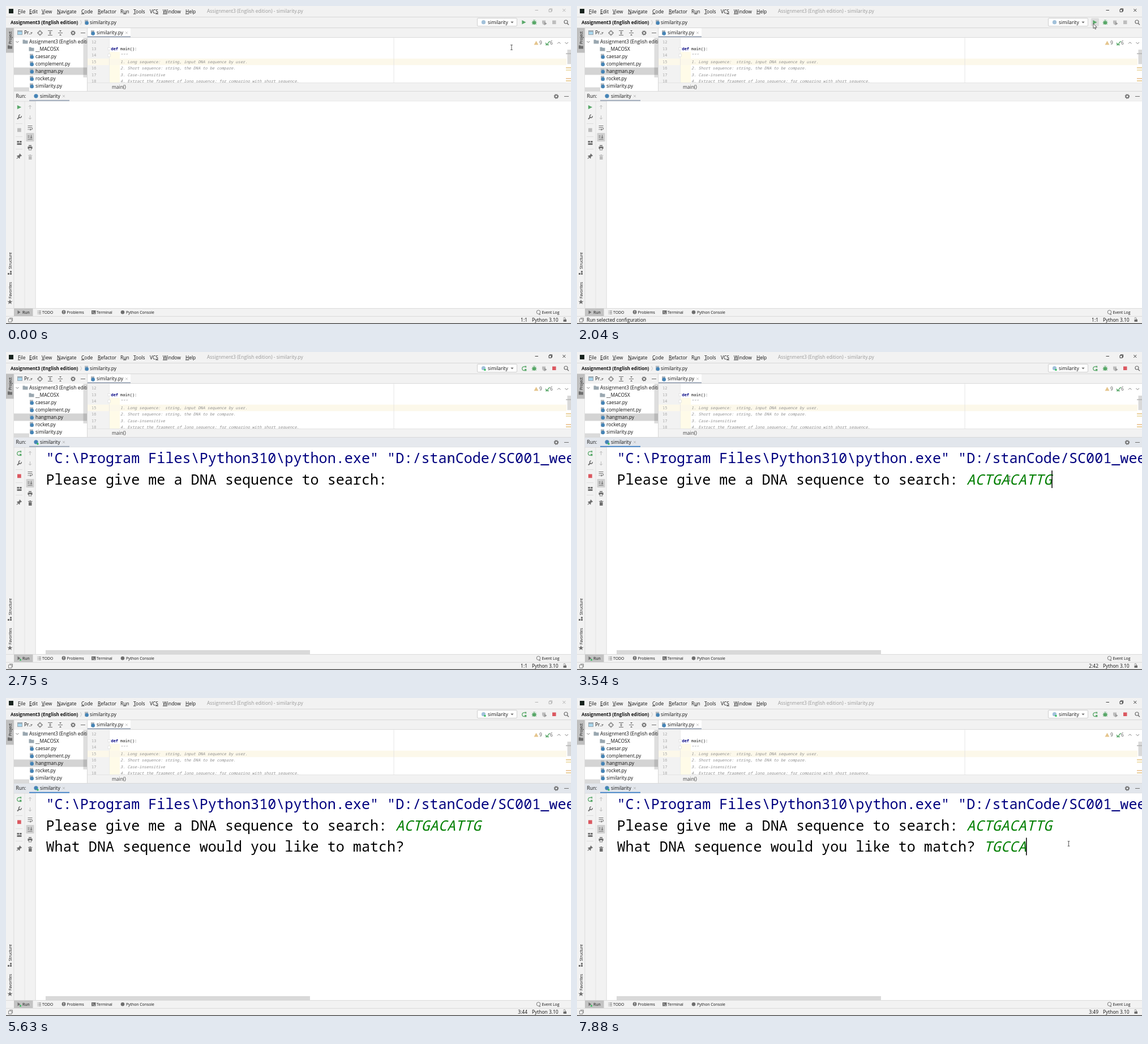
Recreate the animation shown at these times as an HTML page. Size 998 by 561 pixels, loop 8 s.

```html
<!DOCTYPE html>
<html lang="en">
<head>
<meta charset="utf-8">
<title>DNA similarity run</title>
<style>
html, body { margin: 0; width: 100%; height: 100%; overflow: hidden; background: #f2f2f2; }
svg { display: block; width: 998px; height: 561px; }
text { font: 8.45px "Open Sans", "Noto Sans", sans-serif; fill: #111; white-space: pre; }
.small { font-size: 6.85px; }
.bold { font-weight: 700; font-size: 8.1px; }
.dim { fill: #999; }
.code { font: 6.93px "Noto Sans Mono", "DejaVu Sans Mono", monospace; }
.doc { fill: #8c8c8c; font-style: italic; }
.num { fill: #a3a3a3; }
.key { fill: #000080; font-weight: 600; }
.term { font: 25.12px "Noto Sans Mono", "DejaVu Sans Mono", monospace; fill: #000; }
.cmd { fill: #00007f; }
.input { fill: #007f00; font-style: italic; }
.u { text-decoration: underline; text-decoration-thickness: .6px; }
</style>
</head>
<body>
<svg id="stage" viewBox="0 0 998 561" xmlns="http://www.w3.org/2000/svg"></svg>
<script>
const LOOP = 8000;
const GREY = '#6e6e6e', PALE = '#bdbdbd', GREEN = '#59a869', RED = '#db5860', LINE = '#d1d1d1';
const COL = 15.07, LEFT = 70.5;

const rect = (x, y, w, h, fill, more = '') =>
  `<rect x="${x}" y="${y}" width="${w}" height="${h}" fill="${fill}" ${more}/>`;
const path = (d, stroke = GREY, more = '') =>
  `<path d="${d}" fill="none" stroke="${stroke}" ${more}/>`;
const shape = (d, fill = GREY) => `<path d="${d}" fill="${fill}"/>`;
const dot = (x, y, r, fill, more = '') => `<circle cx="${x}" cy="${y}" r="${r}" fill="${fill}" ${more}/>`;
// y is the middle of the text line
const text = (x, y, s, cls = '', more = '') =>
  `<text x="${x}" y="${y + (cls === 'small' ? 2.5 : 3)}" class="${cls}" ${more}>${s}</text>`;
const group = (id, body) => `<g id="${id}">${body}</g>`;

const play = (x, y, s = 3.6) => shape(`M${x - s} ${y - s}L${x + s} ${y}L${x - s} ${y + s}Z`, GREEN);
const cross = (x, y) => path(`M${x - 2} ${y - 2}l4 4m0-4l-4 4`, '#aaa', 'stroke-width=".7"');
const down = (x, y, s = 2.6) => shape(`M${x - s} ${y - s / 2}h${2 * s}l${-s} ${s * 1.2}Z`);
const blob = (x, y, more) => dot(x, y, 3.6, '#4584b6', more);
const pyFile = (x, y) => rect(x - 3, y - 4.5, 6, 8, '#aeb6bd') + dot(x + .8, y + 1, 3.2, '#4584b6');
const folder = (x, y) => shape(`M${x - 4.5} ${y - 3.5}h3.5l1.2 1.3h4.3v5.7h-9Z`, '#9aa7b0');
const gear = (x, y) => dot(x, y, 2.5, 'none', `stroke="${GREY}" stroke-width="1.7"`) +
  dot(x, y, 3.7, 'none', `stroke="${GREY}" stroke-width="1.2" stroke-dasharray="1.45 1.45"`);
const rerun = (x, y) =>
  path(`M${x + 2} ${y - 2.6}A3.4 3.4 0 1 0 ${x + 3.4} ${y + 1}`, GREEN, 'stroke-width="1.3"') +
  shape(`M${x + 1} ${y - 4.6}l3.4 .4l-.8 3.6Z`, GREEN) + rect(x + 1, y + 1, 3.4, 3.4, GREEN);
const dash = (x, y) => path(`M${x - 4} ${y}h8`);

function titleBar() {
  const menu = [[21, '_File'], [41, '_Edit'], [63, '_View'], [90, '_Navigate'], [133, '_Code'],
    [162, '_Refactor'], [202, 'R_un'], [225, '_Tools'], [254, 'VC_S'], [277, '_Window'], [317, '_Help']];
  return rect(5, 5, 8, 8, '#17231d') +
    menu.map(([x, s]) => text(x, 9.5, s.replace(/_(.)/, '<tspan class="u">$1</tspan>'))).join('') +
    text(355, 9.3, 'Assignment3 (English edition) - similarity.py', 'dim') +
    `<g id="win" fill="none" stroke-width=".8"><path d="M934.500 7.500h5.500M959 6h4.300v4.300h-4.300ZM960.300 6v-1.200h4.300v4.300h-1.300M983.300 5l5 5m0-5l-5 5"/></g>` +
    rect(0, 19, 998, .8, LINE);
}

function navBar() {
  const bug = dot(933, 29.5, 3.2, GREEN) +
    path('M929 26.500l8 6M937 26.500l-8 6M928.500 29.500h9M931 25l4 0', GREEN, 'stroke-width=".9"');
  return text(8, 28.7, 'Assignment3 (English edition)', 'bold') +
    path('M131.500 25l2 4l-2 4', '#aaa', 'stroke-width=".6"') + pyFile(142, 29) + text(148, 28.7, 'similarity.py') +
    rect(832.5, 21.5, 70, 14, '#fff', 'rx="1.500" stroke="#c4c4c4" stroke-width=".8"') +
    blob(843.5, 28.7, 'opacity=".5"') + text(851, 28.7, 'similarity') + down(894, 28.7) +
    group('hover', rect(908, 21.5, 14, 14, '#dcdcdc', 'rx="1.500"')) +
    group('topIdle', play(915, 28.7) + rect(965, 25.5, 6.5, 6.5, PALE)) +
    group('topRun', rerun(915, 29) + rect(965, 25.5, 6.5, 6.5, RED) + dot(846, 31.500, 1.7, '#32c05a')) +
    bug + shape('M947 25.500h6v4q-1 3-3 4q-3-2-3-4Z', PALE) + shape('M951 28l4.500 3l-4.500 3Z', '#999') +
    dot(989, 28, 3, 'none', `stroke="${GREY}" stroke-width="1.200"`) + path('M991 30.300l3 3', GREY, 'stroke-width="1.400"') +
    rect(0, 38, 998, .8, LINE);
}

function sidebar() {
  const tab = (y, s) => `<text class="small" transform="translate(9.500 ${y}) rotate(-90)">${s}</text>`;
  return rect(0, 38.5, 14, 44, '#bfbfbf') + tab(67, 'Project') + shape('M3 69.500h3l1 1h4v5h-8Z') +
    tab(464, 'Structure') + rect(3, 471, 3, 3, GREY) + rect(7, 471, 3, 3, GREY) + rect(7, 467.3, 3, 3, GREY) +
    tab(516, 'Favorites') + shape('M7 517.500l1.200 3.200h3.400l-2.700 2l1 3.200l-2.900-2l-2.900 2l1-3.200l-2.700-2h3.400Z') +
    rect(13.5, 38, .7, 495, LINE);
}

function projectPane() {
  const files = ['caesar.py', 'complement.py', 'hangman.py', 'rocket.py', 'similarity.py'];
  return rect(14, 56, 129, 94.5, '#fff') + rect(14, 108.5, 129, 13, '#d4d4d4') +
    rect(20, 43, 9, 8, '#9aa7b0') + rect(21, 45.500, 7, 4.500, '#a9d7ee') + text(32, 47, 'Pr..') + down(45, 47.5, 2) +
    dot(60, 47.5, 3.5, 'none', `stroke="${GREY}"`) + path('M60 42.500v3.500M60 49v3.500M55 47.500h3.500M61.500 47.500h3.500') +
    path('M74 43.500h8M74 51.500h8') + shape('M76 47l2-2.200l2 2.200ZM76 48l2 2.200l2-2.200Z') +
    path('M92 47.500h8') + shape('M94 43l2 2.500l2-2.500ZM94 52l2-2.500l2 2.500Z') +
    gear(118.5, 47.5) + dash(136, 47.5) +
    path('M17.500 62l2.500 2.500l2.500-2.500', GREY, 'stroke-width=".9"') + folder(34, 63) +
    `<g clip-path="url(#tree)">${text(41, 62.7, 'Assignment3 (English edition)')}</g>` +
    folder(45, 76) + text(52, 75.7, '__MACOSX') +
    files.map((s, i) => pyFile(45, 89 + i * 13) + text(52, 88.7 + i * 13, s)).join('') +
    rect(136.5, 56, 6.5, 70, '#000', 'opacity=".13"') + rect(14, 143.5, 27, 6.5, '#dadada') +
    rect(143, 38, .8, 112, LINE);
}

function editor() {
  const code = ['', '<tspan class="key">def</tspan> main():', '    """',
    '    1. Long sequence:  string, input DNA sequence by user.',
    '    2. Short sequence: string, the DNA to be compare.', '    3. Case-insensitive',
    '    4. Extract the fragment of long sequence; for comparing with short sequence.'];
  const marks = [[84, '#b5b5b5'], [109, '#e3c07a'], [113, '#e8d69b'], [128, '#e8bb85'], [132, '#e3c07a']];
  const lines = code.map((s, i) => {
    const y = 66.3 + i * 11.5;
    return `<text x="151" y="${y}" class="code num">${i + 12}</text>` +
      `<text x="185.500" y="${y}" class="code ${i > 1 ? 'doc' : ''}">${s}</text>`;
  }).join('');
  return rect(144, 39, 76, 16, '#fff') + pyFile(153, 47.5) + text(160, 47, 'similarity.py') + cross(213, 47.3) +
    rect(144, 53.3, 76, 2, '#9ca7b8') + rect(144, 55.3, 854, .7, LINE) +
    rect(182, 56, 816, 79.5, '#fff') + rect(183, 81, 18, 54.5, '#fffbe8') + rect(144, 92.8, 846, 11.5, '#fcf8ea') +
    rect(182, 56, .6, 79, '#dedede') + rect(684.7, 56, .7, 79, '#dcdcdc') +
    `<g clip-path="url(#edit)">${lines}</g>` +
    [75.5, 87].map(y => rect(180, y - 2.2, 4.4, 4.4, '#fff', 'stroke="#d2d2d2" stroke-width=".5"')).join('') +
    shape('M936.500 61.500l4 7h-8Z', '#e5c58c') + text(942, 65, '9', '', 'fill-opacity=".7"') +
    path('M953 65l2.500 3l5-6M953 68.500h6', GREEN, 'stroke-width="1.400"') + text(961, 65, '6', '', 'fill-opacity=".7"') +
    path('M974 66.500l2.700-2.700l2.700 2.700M987.500 64l2.700 2.700l2.700-2.700', GREY, 'stroke-width=".9"') +
    rect(991.5, 77, 6.5, 25.5, '#d9d9d9') + marks.map(([y, c]) => rect(989, y - .7, 9, 1.5, c)).join('') +
    rect(144, 135.3, 854, 15, '#f2f2f2') + rect(144, 135, 854, .6, '#ddd') +
    text(187, 142.8, 'main()', '', 'fill-opacity=".8"');
}

function runPane() {
  const arrow = (y, d) => path(`M42.500 ${y - 3.3}v6.600M${40} ${y + d * .8}l2.500 ${d * 2.5}l2.500 ${-d * 2.5}`, '#b5b5b5', 'stroke-width=".9"');
  const bin = c => rect(40, 264.7, 5.5, 6.3, c) + rect(39, 263, 7.5, 1, c) + rect(41.5, 262, 2.5, 1, c);
  const sep = y => rect(17, y, 12, .6, '#d0d0d0');
  const term = (id, x, y, s, cls = '') => group(id, `<text x="${x}" y="${y}" class="term ${cls}">${s}</text>`);
  return `<rect id="head" x="14" y="150.500" width="984" height="17.500"/>` + rect(14, 150, 984, .7, LINE) +
    text(17.5, 158.8, 'Run:') + blob(53, 158.8) + text(60, 158.8, 'similarity') + cross(102, 159) +
    `<rect id="under" x="41" y="165.800" width="71" height="2"/>` + gear(972, 159.5) + dash(990, 159.5) +
    rect(14, 167.8, 984, .6, LINE) + rect(52, 168.2, 946, 364.8, '#fff') +
    rect(32.7, 168, .6, 365, '#d8d8d8') + rect(51.8, 168, .7, 365, LINE) +
    group('leftIdle', play(23.5, 178.5) + rect(20, 215.5, 6.7, 6.7, PALE) + bin(PALE)) +
    group('leftRun', rerun(23, 178.8) + rect(20, 215.5, 6.7, 6.7, RED) + bin(GREY) + dot(56, 162, 1.7, '#32c05a')) +
    path('M20 199.500l4-4', GREY, 'stroke-width="2"') + path('M27.300 194a2.500 2.500 0 1 1 -2.300-2', GREY, 'stroke-width="1.400"') +
    sep(207) + sep(230) + rect(19.5, 238, 3.6, 3, GREY) + rect(24, 238, 3.6, 3, GREY) + rect(19.5, 242, 8, 3, GREY) +
    sep(252) + shape('M24 260l4 4l-1 1l-1-.3l-1.500 1.700v2l-1 .8l-1.700-1.900l-2.500 2.500l-.8-.8l2.500-2.500l-1.900-1.700l.8-1h2l1.700-1.500Z') +
    arrow(178.5, -1) + arrow(196.5, 1) +
    path('M38.500 211.500h8M38.500 214.500h6.500a1.700 1.700 0 0 1 0 3.400h-2.500M38.500 217.800h2') + shape('M43.500 216l-2.300 2l2.300 2Z') +
    rect(35.5, 224, 14, 15, '#cfcfcf', 'rx="1"') +
    path('M38.500 229h3M38.500 231.500h3M38.500 235h8M44.500 227.500v5') + shape('M42.500 231h4l-2 2.700Z') +
    rect(38.5, 248, 8, 4, GREY) + rect(40, 245.5, 5, 1.7, GREY) + rect(40.3, 250.5, 4.4, 3.5, '#f2f2f2', `stroke="${GREY}" stroke-width=".8"`) +
    `<g clip-path="url(#console)">` +
    term('command', LEFT, 196.3, '"C:\\Program Files\\Python310\\python.exe" "D:/stanCode/SC001_week', 'cmd') +
    term('ask', LEFT, 233.8, 'Please give me a DNA sequence to search: ') +
    term('long', LEFT + 41 * COL, 233.8, 'ACTGACATTG', 'input') +
    term('askShort', LEFT, 271.3, 'What DNA sequence would you like to match? ') +
    term('short', LEFT + 43 * COL, 271.3, 'TGCCA', 'input') +
    '</g>' + group('scroll', rect(70, 526, 467, 7, '#d9d9d9')) + rect(0, 0, 1.5, 31, '#000', 'id="caret"');
}

function bottom() {
  const y = 540.3;
  return rect(0, 533, 998, .7, LINE) + rect(14, 533.5, 33.5, 13.5, '#c3c3c3') +
    shape('M20.500 537l5 3.300l-5 3.300Z') + group('runDot', dot(25.500, 543, 1.6, '#32c05a')) + text(29, y, 'Run', 'small') +
    path('M55.500 538h1M55.500 540.500h1M55.500 543h1M57.500 538h4.500M57.500 540.500h4.500M57.500 543h4.500', GREY, 'stroke-width=".9"') +
    text(64, y, 'TODO', 'small') +
    dot(102, 540, 3.4, GREY) + rect(101.5, 537.8, 1, 2.7, '#fff') + rect(101.5, 541.3, 1, 1, '#fff') + text(107.5, y, 'Problems', 'small') +
    rect(151, 537, 7.5, 6.5, GREY) + path('M152.500 538.500l1.700 1.500l-1.700 1.500M155 542h2', '#fff', 'stroke-width=".7"') +
    text(160, y, 'Terminal', 'small') + dot(206, 540.3, 3.3, GREY) + text(212, y, 'Python Console', 'small') +
    dot(940.5, 540, 3.3, 'none', `stroke="${GREY}" stroke-width=".9"`) + path('M942.500 542.500l1.500 1.700h-3', GREY, 'stroke-width=".9"') +
    text(946.5, y, 'Event Log', 'small') + rect(0, 547, 998, .7, LINE) +
    path('M6 550.500h5.500v5.500M4.500 552h5.500v5.500h-5.500Z', GREY, 'stroke-width=".8"') +
    group('hint', text(17, 553.8, 'Run selected configuration')) +
    text(921, 553.8, '1:1', '', 'id="place" text-anchor="end"') + text(929, 553.8, 'Python 3.10') +
    rect(984.5, 553, 5.5, 4, GREY) + path('M988 553v-1.500a1.600 1.600 0 0 0-3.200 0', GREY, 'stroke-width=".9"') +
    rect(0, 559.7, 998, 1.3, '#3a3a3a');
}

const clip = (id, x, y, w, h) => `<clipPath id="${id}">${rect(x, y, w, h, '#000')}</clipPath>`;
const $ = id => document.getElementById(id);
$('stage').innerHTML = `<defs>${clip('tree', 14, 56, 129, 94)}${clip('edit', 144, 56, 846, 79)}${clip('console', 53, 168, 945, 365)}</defs>` +
  rect(0, 0, 998, 561, '#f2f2f2') + sidebar() + projectPane() + editor() + runPane() + bottom() + titleBar() + navBar() +
  group('arrow', '<path d="M0 0V8.600L2 6.800L3.400 10L4.700 9.400L3.400 6.400H6.200Z" fill="#fff" stroke="#222" stroke-width=".7"/>') +
  group('beam', path('M-1.900-4.200H1.900M-1.900 4.200H1.900M0-4.200V4.200', '#333', 'stroke-width=".8"'));

// visible from, until
const spans = {
  hover: [1600, 2360], hint: [1600, 2360],
  leftIdle: [0, 2160], leftRun: [2160, LOOP], runDot: [2160, LOOP],
  topIdle: [0, 2330], topRun: [2330, LOOP],
  command: [2200, LOOP], scroll: [2200, LOOP], ask: [2500, LOOP], long: [3540, LOOP],
  askShort: [5130, LOOP], short: [7750, LOOP]
};
// from, until, row, column
const carets = [[3130, 3540, 1, 41], [3540, 4080, 1, 51], [4580, 5000, 1, 51], [5000, 5130, 2, 0],
  [5130, 5630, 2, 43], [7250, 7750, 2, 43], [7750, LOOP, 2, 48]];
const places = [[0, '1:1'], [3130, '2:42'], [3670, '2:52'], [5000, '3:1'], [5130, '3:44'], [7880, '3:49']];
// time, x, y of the pointer
const moves = [[0, 893, 73], [850, 893, 73], [1500, 907, 37.5], [1670, 911, 32], [1790, 912, 31], [2300, 912, 31],
  [2500, 870, 82], [2790, 770, 205], [2960, 764, 223.5], [4300, 764, 223.5], [4710, 1010, 240],
  [6800, 1010, 248], [6830, 970, 250], [7290, 868.5, 257], [LOOP, 868.5, 257]];

const show = (id, on) => { $(id).style.display = on ? '' : 'none'; };

function pointer(t) {
  const i = Math.max(1, moves.findIndex(m => m[0] > t));
  const [a, b] = [moves[i - 1], moves[i]];
  const k = (t - a[0]) / (b[0] - a[0]);
  return [a[1] + (b[1] - a[1]) * k, a[2] + (b[2] - a[2]) * k];
}

function draw(t) {
  for (const id in spans) show(id, t >= spans[id][0] && t < spans[id][1]);

  const away = t < 2000 || (t >= 5630 && t < 7250);
  $('win').setAttribute('stroke', away ? '#a5a5a5' : '#111');
  $('head').setAttribute('fill', t < 2160 ? '#f2f2f2' : t < 3130 ? '#e6e9ee' : '#e2e6ec');
  $('under').setAttribute('fill', t < 3130 ? '#9ca7b8' : '#4083c9');
  $('place').textContent = places.filter(p => p[0] <= t).pop()[1];

  const caret = carets.find(c => t >= c[0] && t < c[1]);
  show('caret', caret);
  if (caret) {
    $('caret').setAttribute('x', LEFT - 1.5 + caret[3] * COL + .7);
    $('caret').setAttribute('y', 171.5 + caret[2] * 37.5);
  }

  const [x, y] = pointer(t);
  const overText = (y > 56 && y < 135) || y > 168;
  show('beam', overText);
  show('arrow', !overText);
  $(overText ? 'beam' : 'arrow').setAttribute('transform', `translate(${x} ${y})`);
}

const start = performance.now();
function tick() {
  draw((performance.now() - start) % LOOP);
  requestAnimationFrame(tick);
}
tick();
</script>
</body>
</html>
```
